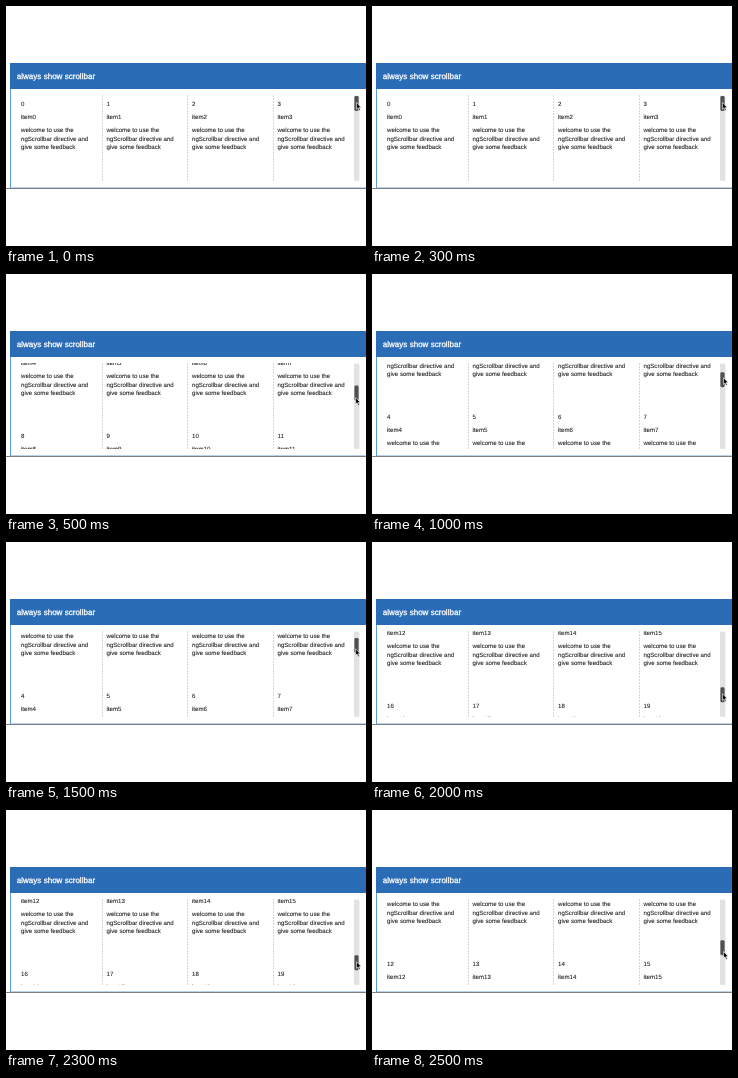
An HTML page that plays this animation: 360x240 px, repeating every 3 s.

```html
<!DOCTYPE html>
<html lang="en">
<head>
<meta charset="utf-8">
<title>Scrollbar demo</title>
<style>
html, body { margin: 0; width: 100%; height: 100%; overflow: hidden; background: #fff; }
svg { display: block; width: 360px; height: 240px; }
text { font-family: "Liberation Sans", Arial, sans-serif; text-rendering: geometricPrecision; white-space: pre; }
#list text { font-size: 6.12px; fill: #222; stroke: #222; stroke-width: .08px; }
#title { font-size: 8.05px; fill: #fff; stroke: #fff; stroke-width: .3px; }
</style>
</head>
<body>
<svg viewBox="0 0 360 240" width="360" height="240">
  <defs>
    <clipPath id="view"><rect x="5" y="89" width="340" height="86"/></clipPath>
  </defs>
  <rect width="360" height="240" fill="#fff"/>
  <rect x="4" y="57" width="1" height="125" fill="#5b9bd8"/>
  <rect x="4" y="57" width="356" height="26" fill="#2a6cb6"/>
  <rect x="5" y="181" width="355" height="1" fill="#b9d3ec"/>
  <rect y="182" width="360" height="1" fill="#7b7f85"/>
  <text id="title" x="10.8" y="72.8">always show scrollbar</text>
  <g id="rules" stroke="#d6d6d6" stroke-width="1" stroke-dasharray="2 1"></g>
  <g clip-path="url(#view)"><g id="list"></g></g>
  <rect x="348" y="89.5" width="5.4" height="85.5" rx="1.5" fill="#e2e2e2"/>
  <rect id="thumb" x="348.4" width="4.2" height="15" rx="1.4" fill="#505050"/>
  <path id="cursor" d="M0 0V6.6L1.5 5.3L2.6 7.9L3.8 7.4L2.7 4.9H4.7Z"
        fill="#000" stroke="#fff" stroke-width=".6" stroke-linejoin="round"/>
</svg>
<script>
const NS = "http://www.w3.org/2000/svg";
const $ = id => document.getElementById(id);
const STEP = 500, ROWS = 6, COLS = 4, ROW_H = 86, COL_W = 85.5;
const NOTE = ["welcome to use the", "ngScrollbar directive and", "give some feedback"];
const LINES = [100.2, 113.1, 126, 134.6, 143.2];

// scroll offset, pointer x, pointer y
const STOPS = [
  [0, 350.5, 96.5],
  [108, 349.6, 123.5],
  [41, 351.5, 103.7],
  [30, 349.6, 106.8],
  [278, 350.5, 151.7],
  [202, 351.5, 141.5]
];

function add(parent, tag, attrs, text) {
  const el = document.createElementNS(NS, tag);
  for (const key in attrs) el.setAttribute(key, attrs[key]);
  if (text !== undefined) el.textContent = text;
  parent.appendChild(el);
}

for (let i = 0; i < ROWS * COLS; i++) {
  const x = 15 + (i % COLS) * COL_W;
  const top = Math.floor(i / COLS) * ROW_H;
  [String(i), "item" + i, ...NOTE].forEach((line, n) =>
    add($("list"), "text", { x, y: top + LINES[n] }, line));
}

for (const x of [96.5, 181.5, 267.5])
  add($("rules"), "line", { x1: x, x2: x, y1: 89, y2: 175 });

function draw(ms) {
  const [offset, x, y] = STOPS[Math.floor(ms / STEP) % STOPS.length];
  $("list").setAttribute("transform", `translate(0 ${-offset})`);
  $("thumb").setAttribute("y", 90 + offset * 0.199);
  $("cursor").setAttribute("transform", `translate(${x} ${y})`);
}

const start = performance.now();
function tick() {
  draw(performance.now() - start);
  requestAnimationFrame(tick);
}
tick();
</script>
</body>
</html>
```
